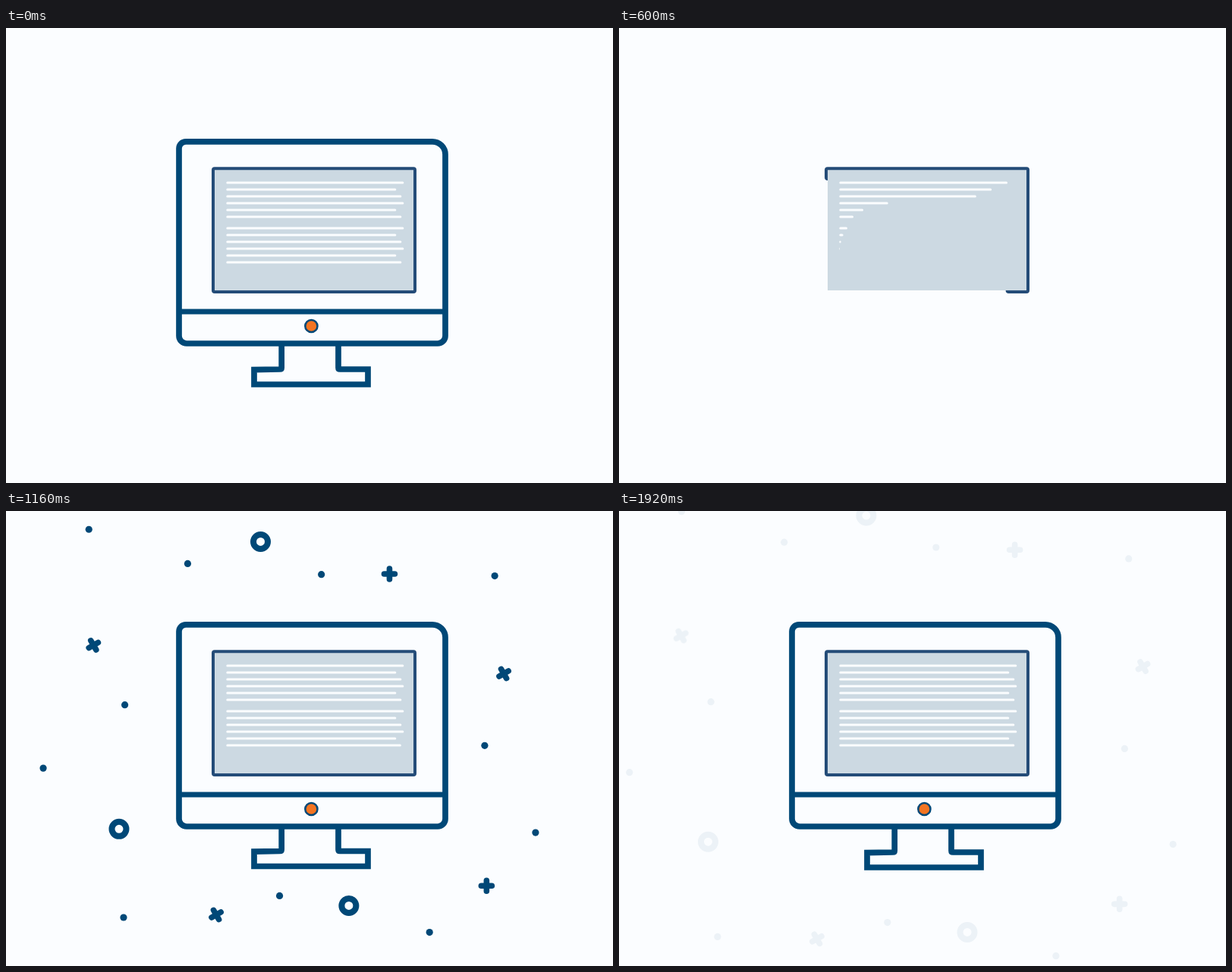
An HTML page that plays this animation: 800x600 px, repeating every 2.2 s.

```html
<!DOCTYPE html>
<html lang="en">
<head>
<meta charset="utf-8">
<title>Computer</title>
<style>
  html, body { margin: 0; width: 100%; height: 100%; overflow: hidden; background: #fbfdff; }
  svg { display: block; width: 100vw; height: 100vh; }
  .line { fill: #fbfdff; stroke: #004877; stroke-width: 7.7; }
</style>
</head>
<body>
<svg viewBox="0 0 800 600">
  <g id="sparks"></g>
  <path id="stand" class="line" d="M363.2 412V448Q363.2 450 361 450L327 450.6V470H477V450H440Q438 450 438 448V412"/>
  <g id="body">
    <path class="line" d="M237 149.8H562A17 17 0 0 1 579 166.8V406A10 10 0 0 1 569 416H238A10 10 0 0 1 228 406V158.8A9 9 0 0 1 237 149.8Z"/>
    <path class="line" style="stroke-width:7.2" d="M228 374H579"/>
    <circle cx="402.4" cy="393" r="8.1" fill="#f37421" stroke="#004877" stroke-width="2.5"/>
  </g>
  <path id="border" d="M275 197V187.2H537V346H275V197" pathLength="1" fill="none" stroke="#244c78" stroke-width="8" stroke-linecap="round" stroke-linejoin="round"/>
  <path id="panel" d="M275 187.2H537V346H275Z" fill="#ccd9e2"/>
  <g id="text" fill="#fbfdff"></g>
</svg>
<script>
const LOOP = 2200, STEP = 40, POSTER = 120, LAST = 1920;
const BURST = 880, OUT = 1040, SETTLED = 1280;
const CX = 403.5, CY = 283.3;
const $ = id => document.getElementById(id);

// Where each spark is once the burst has settled.
const SPARKS = {
  dot: [[105, 20.5], [236, 65], [416, 78], [648.5, 82], [151, 255], [43.5, 340],
    [636.5, 310], [703, 426.5], [151, 540], [359.5, 513], [561, 560.5]],
  ring: [[334, 35], [144, 422], [453, 526]],
  plus: [[508, 78], [637.5, 498]],
  cross: [[110, 175], [661.5, 213], [274.5, 537.5]]
};

const clamp = u => Math.max(0, Math.min(1, u));
const lerp = (a, b, u) => a + (b - a) * u;
const span = (t, from, to) => clamp((t - from) / (to - from));
const smooth = u => u * u * (3 - 2 * u);
const easeOut = u => 1 - (1 - u) ** 2;

// Cubic bezier timing with handles (1, 0) and (0.12, 1).
function snap(u) {
  if (u <= 0 || u >= 1) return clamp(u);
  let lo = 0, hi = 1;
  for (let i = 0; i < 30; i++) {
    const s = (lo + hi) / 2, r = 1 - s;
    if (3 * s * r * r + 0.36 * s * s * r + s * s * s < u) lo = s; else hi = s;
  }
  return smooth(lo);
}

function add(parent, name, attrs) {
  const node = document.createElementNS("http://www.w3.org/2000/svg", name);
  for (const key in attrs) node.setAttribute(key, attrs[key]);
  return parent.appendChild(node);
}

function makeSpark(kind) {
  const color = "#004877";
  if (kind === "dot") return add($("sparks"), "circle", { r: 4.6, fill: color });
  if (kind === "ring") {
    return add($("sparks"), "circle", { r: 9.5, fill: "none", stroke: color, "stroke-width": 8 });
  }
  return add($("sparks"), "path", {
    d: "M-7 0H7M0 -7V7", stroke: color, "stroke-width": 7.6, "stroke-linecap": "round"
  });
}

const sparks = Object.entries(SPARKS).flatMap(([kind, points]) => points.map(([x, y]) => ({
  angle: Math.atan2(y - CY, x - CX),
  radius: Math.hypot(x - CX, y - CY),
  turn: kind === "cross" ? -30 : 0,
  node: makeSpark(kind)
})));

const rows = Array.from({ length: 12 }, (_, i) => ({
  width: [234, 224, 231][i % 3],
  node: add($("text"), "rect", { x: 290.3, y: 202.6 + i * 9 + (i > 5 ? 6 : 0), height: 3, rx: 1.5 })
}));

// Sparks shoot out from the center, then drift on at a steady pace.
function reach(radius, t) {
  const time = Math.max(t, OUT);
  const lag = 4 * (1 - easeOut(span(time, OUT, 1160)));
  const distance = radius + 0.047 * (time - SETTLED) - lag;
  return distance * easeOut(span(t, BURST, OUT));
}

function bodyScale(t) {
  const peak = 1.054;
  return t < 1000 ? peak * smooth(span(t, BURST, 1000)) : lerp(peak, 1, smooth(span(t, 1000, 1120)));
}

function show(node, visible) {
  node.setAttribute("visibility", visible ? "visible" : "hidden");
}

function draw(time) {
  const poster = time < POSTER;
  const t = poster ? LAST : Math.min(LAST, Math.floor(time / STEP) * STEP);

  const trim = smooth(span(t, 200, 960));
  show($("border"), trim > 0);
  $("border").setAttribute("stroke-dasharray", trim < 1 ? `${trim} 2` : "none");
  $("panel").setAttribute("opacity", smooth(span(t, 200, 555)));
  rows.forEach((row, i) => {
    row.node.setAttribute("width", row.width * snap((t - 190 - i * STEP) / 565));
  });

  const scale = bodyScale(t);
  show($("body"), scale > 0);
  $("body").setAttribute("transform", `translate(${CX} ${CY}) scale(${scale}) translate(${-CX} ${-CY})`);
  show($("stand"), t >= 1000);
  $("stand").setAttribute("transform", `translate(0 ${-54 * (1 - smooth(span(t, 980, 1180)))})`);

  show($("sparks"), !poster && t > BURST);
  $("sparks").setAttribute("opacity", 1 - span(t, 1214, 1966));
  for (const { angle, radius, turn, node } of sparks) {
    const r = reach(radius, t);
    const x = CX + r * Math.cos(angle), y = CY + r * Math.sin(angle);
    node.setAttribute("transform", `translate(${x} ${y}) rotate(${turn})`);
  }
}

const begin = performance.now();
function tick() {
  draw((performance.now() - begin) % LOOP);
  requestAnimationFrame(tick);
}
tick();
</script>
</body>
</html>
```
